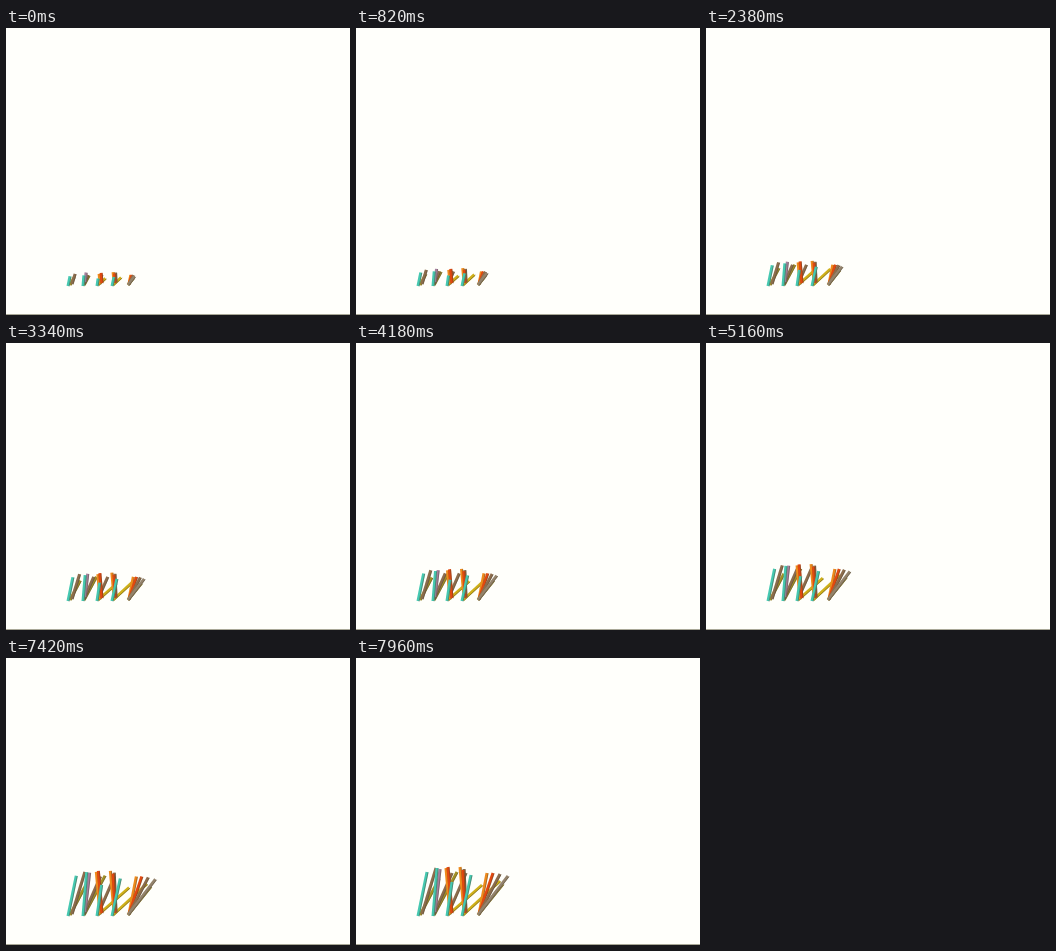
Write an HTML page with a canvas that moves like this. It is 344 px wide and 287 px high and loops after 8000 ms.

```html
<!DOCTYPE html>
<html lang="en">
<head>
<meta charset="utf-8">
<title>Growing stems</title>
<style>
  html, body { margin: 0; width: 100%; height: 100%; overflow: hidden; background: #fffffb; }
  canvas { display: block; width: 344px; height: 287px; }
</style>
</head>
<body>
<canvas id="stage" width="344" height="287"></canvas>
<script>
const W = 344, H = 287, LOOP = 8000;
const canvas = document.getElementById('stage');
const ratio = window.devicePixelRatio || 1;
canvas.width = W * ratio;
canvas.height = H * ratio;
const ctx = canvas.getContext('2d');
ctx.scale(ratio, ratio);

const TEAL = '#45c8b0', RED = '#e2480f', ORANGE = '#ee8a1c', GOLD = '#cfb018',
      OLIVE = '#a39025', BROWN = '#8c6c4c', MAUVE = '#a57f9c', GREY = '#94836c';

// foot x, foot y, full reach dx, dy, colour
const stems = [
  [64, 257, 19, -36, OLIVE], [66, 256, 14, -46, BROWN], [62, 258, 9, -44, TEAL],
  [78, 257, 23, -43, OLIVE], [78, 256, 18, -41, BROWN], [79, 254, 5, -43, MAUVE],
  [77, 258, 4, -48, TEAL],
  [92, 257, 34, -30, GOLD], [92, 256, 18, -41, BROWN], [94, 256, -4, -46, ORANGE],
  [96, 255, -4, -46, RED], [91, 258, 5, -34, TEAL],
  [107, 257, 37, -34, GOLD], [110, 254, -2, -43, BROWN], [108, 254, -4, -45, ORANGE],
  [109, 255, -2, -43, RED], [106, 258, 9, -41, TEAL],
  [123, 256, 8, -41, ORANGE], [123, 256, 14, -41, RED], [123, 256, 21, -40, BROWN],
  [122, 257, 25, -31, OLIVE], [122, 257, 30, -39, GREY]
];

// growth spurts: start ms, end ms, size reached
const spurts = [
  [0, 1560, .385], [1640, 1980, .43], [2220, 2380, .47], [2660, 2680, .49],
  [3080, 3340, .54], [3620, 3780, .58], [4020, 4180, .625], [4480, 4760, .68],
  [5000, 5160, .73], [5460, 5600, .77], [5980, 6040, .81], [6400, 6560, .87],
  [6980, 7120, .91], [7400, 7580, .96], [7940, 7960, 1]
];

function sizeAt(t) {
  let size = .22;
  for (const [start, end, next] of spurts) {
    if (t < start) break;
    size += (next - size) * Math.min(1, (t - start) / (end - start));
  }
  return size;
}

function stroke(x, y, dx, dy, color, width) {
  ctx.strokeStyle = color;
  ctx.lineWidth = width;
  ctx.beginPath();
  ctx.moveTo(x, y);
  ctx.lineTo(x + dx, y + dy);
  ctx.stroke();
}

function draw(t) {
  const size = sizeAt(t);
  ctx.fillStyle = '#fffffb';
  ctx.fillRect(0, 0, W, H);
  ctx.fillStyle = '#a9a897';
  ctx.fillRect(0, 286, W, 1);
  for (const [x, y, dx, dy, color] of stems) {
    stroke(x, y, dx * size, dy * size, color, 3);
    stroke(x + 1.1, y + .4, dx * size, dy * size, 'rgba(75, 65, 45, .5)', .9);
  }
}

function tick() {
  draw(performance.now() % LOOP);
  requestAnimationFrame(tick);
}
tick();
</script>
</body>
</html>
```
